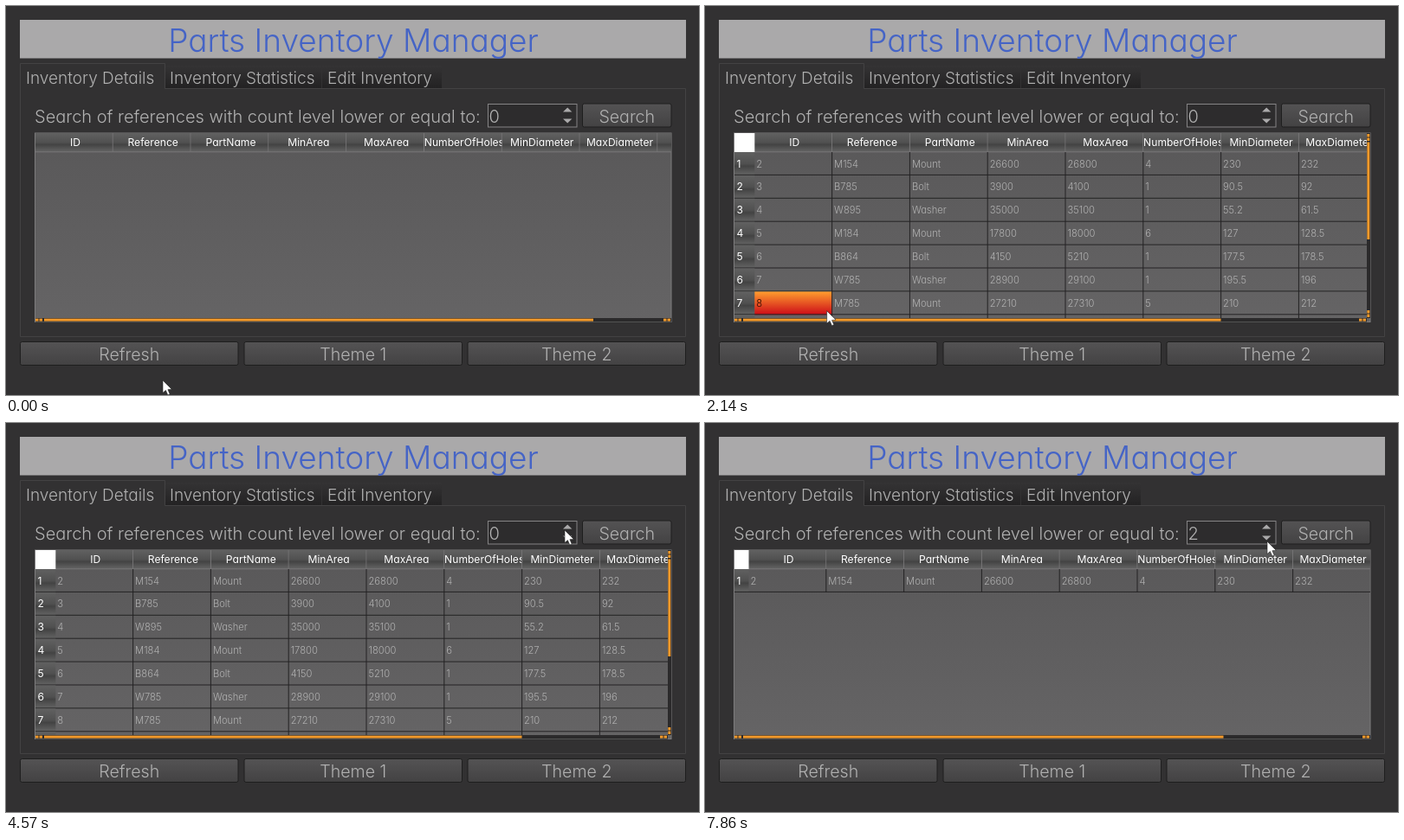
Recreate the animation shown at these times as an HTML page. Size 800 px wide and 450 px high, loop 8000 ms.

```html
<!DOCTYPE html>
<html lang="en">
<head>
<meta charset="utf-8">
<title>Parts Inventory Manager</title>
<style>
html, body { margin: 0; width: 100%; height: 100%; overflow: hidden; background: #323132; }
svg { display: block; }
text {
  font-family: Inter, "Noto Sans", sans-serif;
  font-weight: 300;
  font-feature-settings: "cv11";
  fill: #b1b1b1;
  white-space: pre;
}
.mid { text-anchor: middle; }
.head { font-size: 12.1px; font-weight: 400; fill: #fff; }
.cell { font-size: 11.2px; font-weight: 400; }
.cell rect { fill: none; }
.cell.hot rect { fill: url(#hot); }
.cell.hot text { fill: #2a0c00; }
.button rect { fill: url(#button); stroke: #1e1e1e; }
.button.hot rect { stroke: #f39a2b; stroke-width: 1.8; }
</style>
</head>
<body>
<svg id="stage" width="800" height="450" viewBox="0 0 800 450">
  <defs>
    <linearGradient id="button" x2="0" y2="1"><stop stop-color="#545354"/><stop offset="1" stop-color="#434243"/></linearGradient>
    <linearGradient id="tab" x2="0" y2="1"><stop stop-color="#343334"/><stop offset="1" stop-color="#232223"/></linearGradient>
    <linearGradient id="body" x2="0" y2="1"><stop stop-color="#595859"/><stop offset="1" stop-color="#656465"/></linearGradient>
    <linearGradient id="hot" x2="0" y2="1"><stop stop-color="#ff9d2e"/><stop offset="1" stop-color="#cc0a18"/></linearGradient>
    <linearGradient id="head" x2="0" y2="1">
      <stop stop-color="#616161"/><stop offset=".5" stop-color="#505050"/>
      <stop offset=".6" stop-color="#434343"/><stop offset="1" stop-color="#656565"/>
    </linearGradient>
  </defs>
</svg>
<script>
const stage = document.getElementById("stage");
const LOOP = 8000, FPS = 7;

function add(parent, tag, attrs = {}, content) {
  const node = document.createElementNS("http://www.w3.org/2000/svg", tag);
  for (const key in attrs) node.setAttribute(key, attrs[key]);
  if (content !== undefined) node.textContent = content;
  parent.append(node);
  return node;
}
const box = (parent, x, y, width, height, fill, more) =>
  add(parent, "rect", { x, y, width, height, fill, ...more });
const label = (parent, x, y, size, content, more) =>
  add(parent, "text", { x, y, "font-size": size, ...more }, content);
const inside = (area, x, y) =>
  x >= area.x && x < area.x + area.w && y >= area.y && y < area.y + area.h;

// Window
box(stage, 16, 16, 769, 44.5, "#aaa9aa");
label(stage, 401, 53, 37, "Parts Inventory Manager", { class: "mid", style: "fill:#4564c6" });
add(stage, "path", { d: "M183.5 95.5H784.5V382.5H16.5V66.5H183.5V95.5", fill: "none", stroke: "#434243" });
box(stage, 184, 69, 180, 26, "url(#tab)");
box(stage, 365, 69, 138, 26, "url(#tab)");
[[23, "Inventory Details"], [189, "Inventory Statistics"], [371, "Edit Inventory"]]
  .forEach(([x, name]) => label(stage, x, 90, 19, name));
label(stage, 33, 135, 20, "Search of references with count level lower or equal to:");

// Buttons
const buttons = [
  [16.5, 388.5, 251.5, "Refresh"], [275, 388.5, 251.5, "Theme 1"],
  [533, 388.5, 251.5, "Theme 2"], [665.5, 113, 102.5, "Search"],
].map(([x, y, w, name]) => {
  const node = add(stage, "g", { class: "button" });
  box(node, x, y, w, 27, "", { rx: 2 });
  label(node, x + w / 2, y + 21.7, 19.6, name, { class: "mid" });
  return { node, x, y, w, h: 27 };
});

// Spin box
box(stage, 556.5, 113.5, 102.5, 26.5, "#2d2c2d", { stroke: "#858485" });
const marked = box(stage, 558, 115, 11.5, 24, "#0a74d2");
const value = label(stage, 557.5, 135, 20, "0");
const arrows = add(stage, "path", { d: "M643 122.5l5.2-5 5.2 5zM643 130.5l5.2 5 5.2-5z", fill: "#aaa9aa" });

// Tables
const titles = ["ID", "Reference", "PartName", "MinArea", "MaxArea", "NumberOfHoles", "MinDiameter", "MaxDiameter", ""];
const parts = `2 M154 Mount 26600 26800 4 230 232
3 B785 Bolt 3900 4100 1 90.5 92
4 W895 Washer 35000 35100 1 55.2 61.5
5 M184 Mount 17800 18000 6 127 128.5
6 B864 Bolt 4150 5210 1 177.5 178.5
7 W785 Washer 28900 29100 1 195.5 196
8 M785 Mount 27210 27310 5 210 212`.split("\n").map(line => line.split(" "));
const COL = 89.8, ROW = 26.9, TOP = 169, ORANGE = "#f39a2b";

function table(left, rows, right, handleEnd) {
  const node = add(stage, "g");
  box(node, 33.5, 147, 734.5, 218.5, "url(#body)", { stroke: "#7d7c7d" });
  const view = add(node, "svg", { x: 34, y: 147, width: right - 34, height: 214, viewBox: `34 147 ${right - 34} 214` });
  box(view, 34, 147, 734, 22, "url(#head)");
  titles.forEach((title, i) => {
    const slot = add(view, "svg", { x: left + i * COL, y: 147, width: COL, height: 22 });
    label(slot, COL / 2 + 1, 15, 12.1, title, { class: "head mid" });
    box(slot, COL - 1, 0, 1, 22, "#777677");
  });
  box(view, 34, 168.3, 734, 1, "#777677");
  if (left > 34) box(view, 34, 147, left - 34, 22, "#fff");

  const cells = [];
  rows.forEach((row, r) => {
    const y = TOP + r * ROW;
    box(view, 34, y, left - 34, ROW, "url(#head)");
    label(view, 36.5, y + 17.5, 12, r + 1, { class: "head" });
    row.forEach((content, c) => {
      const x = left + c * COL, cell = add(view, "g", { class: "cell" });
      box(cell, x, y, COL, ROW);
      label(cell, x + 2, y + 17.5, 11.2, content);
      cells.push({ node: cell, x, y, w: COL, h: ROW });
    });
    box(view, 34, y + ROW - 1, 734, 1, "#242324");
  });
  if (rows.length > 1) box(view, 34, TOP + rows.length * ROW, left - 34, ROW, "url(#head)");
  const depth = rows.length > 1 ? 192 : rows.length * ROW;
  if (depth) titles.slice(1).forEach((_, i) => box(view, left + (i + 1) * COL - 1, TOP, 1, depth, "#242324"));

  // Scroll bars
  box(node, 34, 361, right - 34, 4.5, "#2b2a2b");
  [[34, 3.5], [38.5, 3.5], [44, handleEnd - 44], [right - 9, 3.5], [right - 4.5, 3.5]]
    .forEach(([x, w]) => box(node, x, 361.6, w, 3, ORANGE));
  if (right < 768) {
    box(node, 764, 147, 4, 214, "#2b2a2b");
    [[148, 3.5], [152.5, 3.5], [157.5, 112.5], [352, 3.5], [356.5, 3.5]]
      .forEach(([y, h]) => box(node, 764.3, y, 3, h, ORANGE));
  }
  return { node, cells };
}
const tables = [
  table(34, [], 768, 678),
  table(57.3, parts, 764, 595.5),
  table(50.5, parts.slice(0, 1), 768, 598.5),
];

const cursor = add(stage, "path", {
  d: "M0 0V14.6L3.4 11.6 5.8 17 8.2 16 5.9 10.7 10.4 10.4Z",
  fill: "#fff", stroke: "#222", "stroke-width": .6,
});

// Pointer stops: time, x, y
const path = [
  [0, 181, 433], [140, 181, 433], [571, 152, 409], [1950, 152, 409],
  [2350, 128, 290], [2714, 136, 193], [3000, 215, 215], [3140, 215, 215],
  [3714, 383, 276], [4143, 540, 215], [4250, 540, 215], [4571, 645, 124],
  [4750, 647, 119], [5900, 647, 119], [6571, 706, 128], [7200, 706, 128], [7857, 649, 137], [LOOP, 649, 137],
];
function pointerAt(t) {
  const i = Math.max(1, path.findIndex(stop => stop[0] >= t));
  const [t0, x0, y0] = path[i - 1], [t1, x1, y1] = path[i];
  const u = (t - t0) / (t1 - t0), k = u * u * (3 - 2 * u);
  return [x0 + (x1 - x0) * k, y0 + (y1 - y0) * k];
}

function draw(time) {
  const t = Math.floor((time + 5) * FPS / 1000) * 1000 / FPS % LOOP;
  const [x, y] = pointerAt(t);
  const shown = t < 990 ? 0 : t < 6700 ? 1 : 2;
  tables.forEach(({ node }, i) => node.style.display = i === shown ? "" : "none");
  [...buttons, ...tables[shown].cells]
    .forEach(area => area.node.classList.toggle("hot", inside(area, x, y)));

  const count = t < 4990 ? 0 : t < 5560 ? 1 : 2;
  const selected = count > 0 && t < 6700;
  value.textContent = count;
  value.style.fill = selected ? "#fff" : "";
  marked.style.display = selected ? "" : "none";
  arrows.style.fill = inside({ x: 638, y: 114, w: 20, h: 8 }, x, y) ? "#5c5b5c" : "";
  cursor.setAttribute("transform", `translate(${x} ${y})`);
}

let start;
function tick(now) {
  start ??= now;
  draw((now - start) % LOOP);
  requestAnimationFrame(tick);
}
draw(0);
requestAnimationFrame(tick);
</script>
</body>
</html>
```
